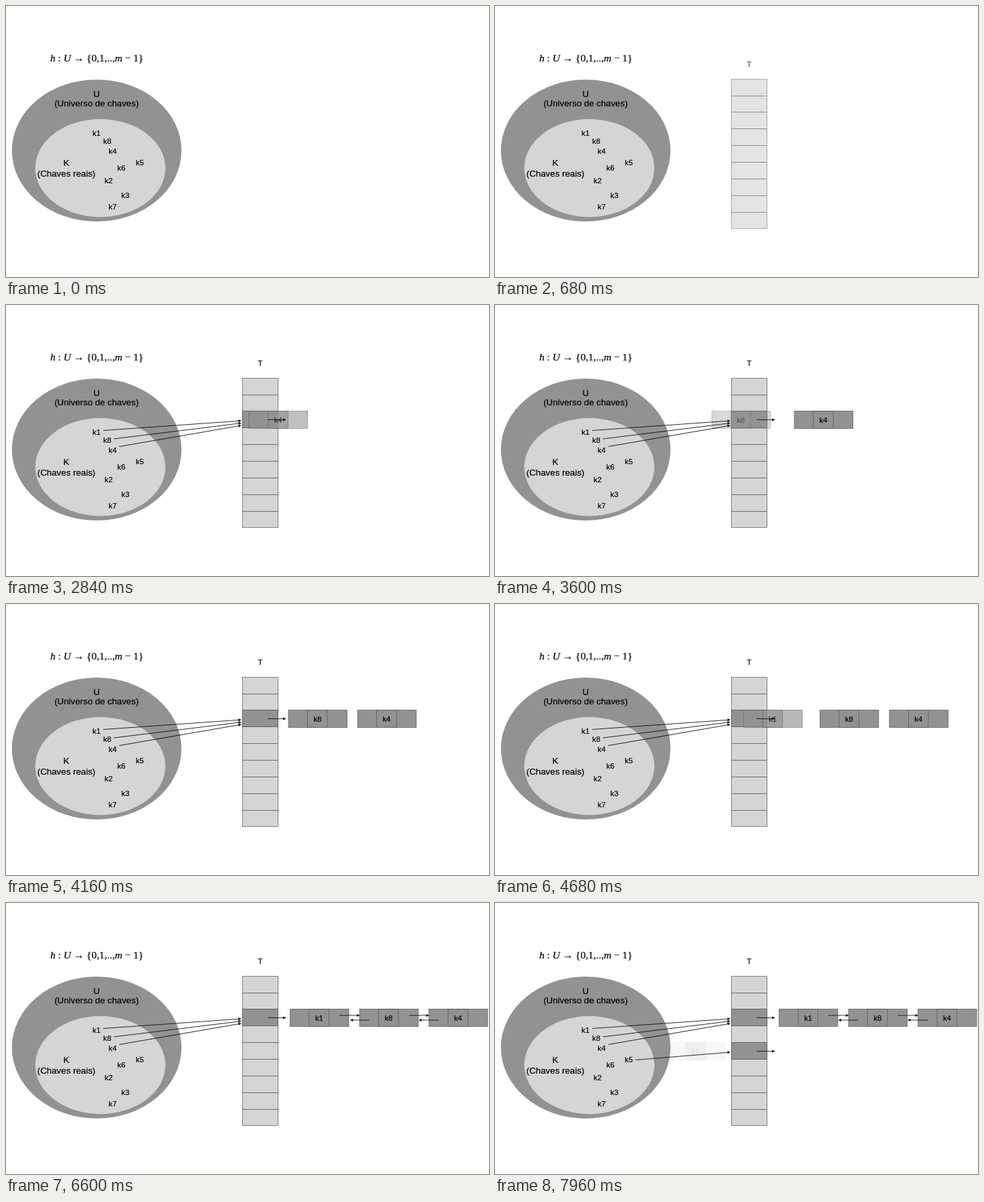
Write an HTML page with a canvas that moves like this. It is 720 px wide and 405 px high and loops after 8000 ms.

```html
<!DOCTYPE html>
<html lang="pt">
<head>
<meta charset="utf-8">
<style>
  html, body { margin: 0; width: 100%; height: 100%; overflow: hidden; background: #fff; }
  canvas { display: block; }
</style>
</head>
<body>
<canvas width="720" height="405"></canvas>
<script>
const ctx = document.querySelector('canvas').getContext('2d');
const LOOP = 8000, DARK = '#929292', LIGHT = '#d5d5d5';
const SANS = '"Liberation Sans", Arial, sans-serif';
const SERIF = '"Liberation Serif", "Times New Roman", serif';

const keys = {
  k1: [135, 193.5], k8: [151, 206], k4: [159, 220.5], k5: [199.5, 237.5],
  k6: [172, 245.5], k2: [153, 264.5], k3: [178, 286.5], k7: [159, 303.5]
};

const TABLE_X = 352.5, TABLE_W = 53;
const rowTop = i => Math.floor(109.25 + i * 24.85) + .5;

const NODE_W = 87.5, NODE_H = 26, PITCH = 103.5;
const ENTRY_X = 251, FIRST_X = 423.5;
const SLIDE = 880, FADE = 447, PUSH_LAG = 60;
const chain = [['k4', 2580], ['k8', 3440], ['k1', 4390]];

const progress = (t, start, duration) => Math.min(1, Math.max(0, (t - start) / duration));

// cubic Bézier easing (.17, .05, .1, 1), solved by bisection
function ease(u) {
  if (u <= 0 || u >= 1) return u;
  const curve = (a, b, s) => 3 * (1 - s) * s * ((1 - s) * a + s * b) + s ** 3;
  let lo = 0, hi = 1;
  for (let i = 0; i < 24; i++) {
    const mid = (lo + hi) / 2;
    if (curve(.17, .1, mid) < u) lo = mid; else hi = mid;
  }
  return curve(.05, 1, lo);
}

function text(str, x, y, size = 11.2, family = SANS, style = '', align = 'center') {
  ctx.font = `${style} ${size}px ${family}`;
  ctx.textAlign = align;
  ctx.fillStyle = ctx.strokeStyle = '#000';
  ctx.lineWidth = .2;
  ctx.fillText(str, x, y);
  ctx.strokeText(str, x, y);
  return ctx.measureText(str).width;
}

function ellipse(x, y, rx, ry, color) {
  ctx.fillStyle = color;
  ctx.beginPath();
  ctx.ellipse(x, y, rx, ry, 0, 0, 2 * Math.PI);
  ctx.fill();
}

function box(x, y, w, h, color) {
  ctx.fillStyle = color;
  ctx.fillRect(x, y, w, h);
  ctx.strokeStyle = '#555';
  ctx.lineWidth = .7;
  ctx.strokeRect(x, y, w, h);
}

function faded(alpha, draw) {
  ctx.globalAlpha = alpha;
  draw();
  ctx.globalAlpha = 1;
}

function arrow(p, x1, y1, x2, y2) {
  if (p <= 0) return;
  const length = Math.hypot(x2 - x1, y2 - y1) * p, neck = Math.max(0, length - 4.5);
  ctx.save();
  ctx.translate(x1, y1);
  ctx.rotate(Math.atan2(y2 - y1, x2 - x1));
  ctx.strokeStyle = ctx.fillStyle = '#000';
  ctx.lineWidth = .8;
  ctx.beginPath();
  ctx.moveTo(0, 0);
  ctx.lineTo(neck, 0);
  ctx.stroke();
  ctx.beginPath();
  ctx.moveTo(length, 0);
  ctx.lineTo(neck, -2);
  ctx.lineTo(neck, 2);
  ctx.fill();
  ctx.restore();
}

function drawFormula(x, y) {
  for (const part of 'h : U → {0,1,..,m − 1}'.split(' ')) {
    for (const piece of part.match(/[a-z]|[^a-z]+/g))
      x += text(piece, x, y, 15.5, SERIF, /[a-z]/i.test(piece) ? 'italic' : '', 'left');
    x += 3.8;
  }
}

function drawSets() {
  ellipse(135.2, 216, 126.4, 106, DARK);
  ellipse(140.6, 242.2, 97, 73.2, LIGHT);
  text('U', 135, 135.7, 13.3);
  text('(Universo de chaves)', 135, 150, 13.3);
  text('K', 90, 239.3, 13.3);
  text('(Chaves reais)', 90, 255, 13.3);
  for (const label in keys) text(label, ...keys[label]);
}

function drawTable(t) {
  faded(progress(t, 500, 285), () => {
    text('T', 379, 91);
    for (let i = 0; i < 9; i++) box(TABLE_X, rowTop(i), TABLE_W, rowTop(i + 1) - rowTop(i), LIGHT);
  });
}

// a used row darkens, then points to its list
function useRow(t, i, start) {
  const y = rowTop(i);
  faded(progress(t, start, 285), () => box(TABLE_X, y, TABLE_W, 25, DARK));
  return () => arrow(progress(t, start + 285, 285), 390, y + 13, 417.5, y + 13);
}

function hashArrow(t, start, label, lift, tipY) {
  const [x, y] = keys[label];
  arrow(progress(t, start, 300), x + 10, y - lift, 351, tipY);
}

function drawNode(t, label, row, start, shift = 0) {
  const x = ENTRY_X + (FIRST_X - ENTRY_X) * ease(progress(t, start, SLIDE)) + shift;
  const y = rowTop(row);
  faded(progress(t, start, FADE), () => {
    box(x, y, NODE_W, NODE_H, DARK);
    box(x + 28.5, y, 29.5, NODE_H, DARK);
    text(label, x + 43.3, y + 17.5);
  });
}

// each newcomer pushes the earlier nodes one place to the right
function drawChain(t) {
  chain.forEach(([label, start], i) => {
    const pushes = chain.slice(i + 1).map(([, s]) => ease(progress(t, s + PUSH_LAG, SLIDE)));
    drawNode(t, label, 2, start, PITCH * pushes.reduce((a, b) => a + b, 0));
  });
}

function drawLinks(t) {
  for (let i = 0; i < 4; i++) {
    const left = FIRST_X + PITCH * (i < 2 ? 2 : 1), y = rowTop(2);
    const p = progress(t, 5380 + 310 * i, 305);
    if (i % 2) arrow(p, left + 14.5, y + 16.5, left - 15.5, y + 16.5);
    else arrow(p, left - 30, y + 9.5, left + .5, y + 9.5);
  }
}

function frame(now) {
  const t = now % LOOP;
  ctx.fillStyle = '#fff';
  ctx.fillRect(0, 0, 720, 405);
  drawFormula(66, 82.5);
  drawSets();
  drawTable(t);
  const pointers = [useRow(t, 2, 1815), useRow(t, 4, 7100)];
  drawChain(t);
  drawNode(t, 'k5', 4, 7930);
  ['k4', 'k8', 'k1'].forEach((label, i) =>
    hashArrow(t, 780 + 282 * i, label, i ? 6 : 9, 180 - 3.5 * i));
  hashArrow(t, 6640, 'k5', 3, 223);
  pointers.forEach(draw => draw());
  drawLinks(t);
  requestAnimationFrame(frame);
}
requestAnimationFrame(frame);
</script>
</body>
</html>
```
